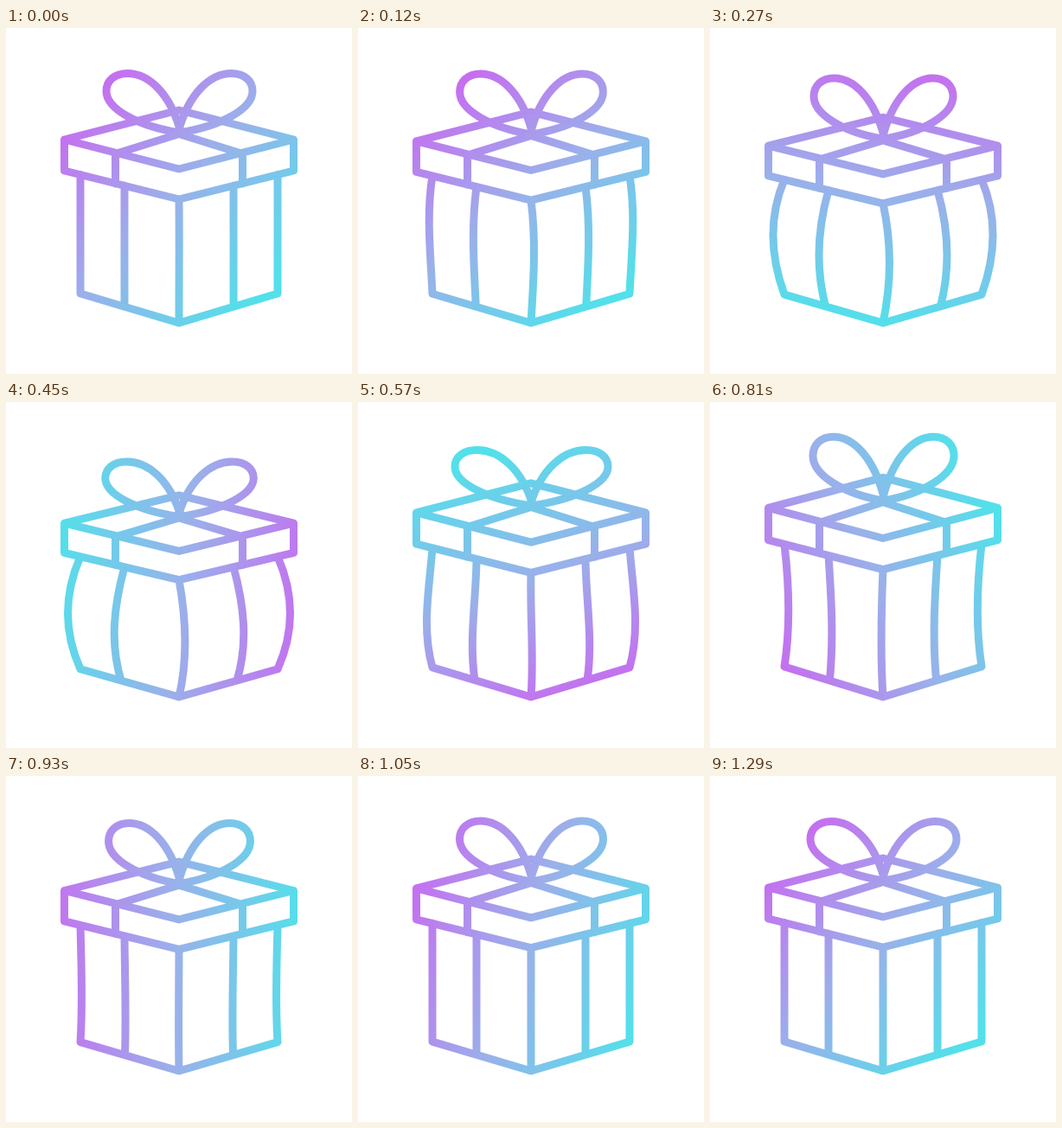
An HTML page that plays this animation: 400 px wide and 400 px high, repeating every 3.32 s.

```html
<!DOCTYPE html>
<html lang="en">
<head>
<meta charset="utf-8">
<title>Gift box</title>
<style>
  html, body { margin: 0; height: 100%; overflow: hidden; background: #fff; }
  svg { display: block; width: 100vw; height: 100vh; }
</style>
</head>
<body>
<svg viewBox="0 0 400 400">
  <linearGradient id="ink" gradientUnits="userSpaceOnUse">
    <stop offset="0" stop-color="#c76cf0"/>
    <stop offset=".5" stop-color="#9ab0ea"/>
    <stop offset="1" stop-color="#53e0ea"/>
  </linearGradient>
  <path id="gift" fill="none" stroke="url(#ink)" stroke-width="9" stroke-linecap="round" stroke-linejoin="round"/>
</svg>
<script>
const LOOP = 3320, STEP = 30, END = 1290, FLOOR = 341, MID = 200;
const ink = document.getElementById('ink');
const gift = document.getElementById('gift');

// Cosine easing from one [time, value] key to the next
const glide = (...keys) => t => {
  const i = keys.findIndex(k => k[0] > t);
  if (i < 1) return 0;
  const [t0, a] = keys[i - 1], [t1, b] = keys[i];
  return a + (b - a) * (1 - Math.cos(Math.PI * (t - t0) / (t1 - t0))) / 2;
};

const drop = glide([0, 0], [460, 11.2], [695, -16], [930, 3.5], [1150, -1], [END, 0]);
const spread = glide([0, 0], [270, -4], [570, 4], [810, -3], [END, 0]);
const bulge = glide([0, 0], [280, 21], [420, 22], [690, -9], [1000, 0]);

// One turn of the gradient, fastest before the middle
function turn(t) {
  const p = t / END, s = p + .11 * Math.sin(Math.PI * p) ** 2;
  return (42 + 360 * s * s * (3 - 2 * s)) * Math.PI / 180;
}

function draw(t) {
  const dy = drop(t), wide = spread(t);
  // The whole gift stretches from the floor up
  const at = (x, y) => x.toFixed(2) + ' ' + (y + dy * (FLOOR - y) / 212).toFixed(2) + ' ';
  const line = (...pts) => 'M' + pts.map(p => at(...p)).join('L');

  let d = line([67.5, 129], [MID, 95], [332.5, 129], [MID, 163]) + 'Z'
    + line([67.5, 129], [67.5, 165], [MID, 198], [332.5, 165], [332.5, 129])
    + line([126.5, 180], [126.5, 145.5], [MID, 122.5], [273.5, 145.5], [273.5, 180])
    + line([86, 307], [MID, FLOOR], [314, 307]);

  // Upright lines: the lower half lags, the inner ones lead and bulge less
  for (const x of [86, 137, MID, 263, 314]) {
    const side = x < MID ? -1 : 1, reach = Math.abs(x - MID) / 114;
    const lead = t + 40 * (1 - reach), k = side * (.48 + .42 * reach * reach);
    const top = k * bulge(lead), low = k * bulge(lead - 60);
    const foot = x + low * .3 * Math.sin(Math.PI * reach);
    const y = 198 - reach * 28.4, footY = FLOOR - Math.abs(foot - MID) * 34 / 114;
    const h = (footY - y) / 3;
    d += 'M' + at(x, y) + 'C' + at(x + top, y + h) + at(foot + low, y + 2 * h) + at(foot, footY);
  }

  for (const side of [-1, 1]) {
    const bow = (x, y) => at(200.5 + side * x * (1 + wide / 84.5), y + wide * 1.1 * (120 - y) / 67.5);
    d += 'M' + bow(-1, 119) + 'C' + bow(11, 75) + bow(36, 52.5) + bow(60, 52.5)
      + 'C' + bow(75, 52.5) + bow(84.5, 61) + bow(84.5, 73)
      + 'C' + bow(84.5, 93) + bow(50, 113) + bow(0, 121);
  }
  gift.setAttribute('d', d);

  const a = turn(t), dx = Math.cos(a), gy = Math.sin(a);
  const ends = { x1: MID - 160 * dx, y1: 197 - 160 * gy, x2: MID + 145 * dx, y2: 197 + 145 * gy };
  for (const k in ends) ink.setAttribute(k, ends[k]);
}

const start = performance.now();
function tick() {
  const t = (performance.now() - start) % LOOP;
  draw(Math.min(END, Math.floor(t / STEP) * STEP));
  requestAnimationFrame(tick);
}
tick();
</script>
</body>
</html>
```
